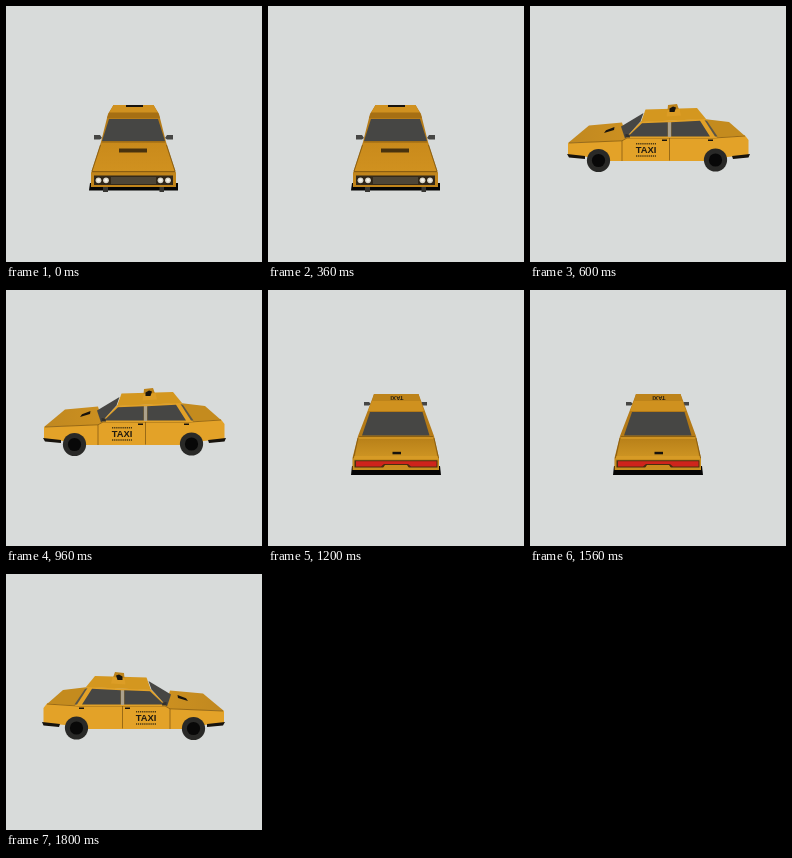
These frames come from a looping animation (256x256 px, 2.4 s). An HTML page:

```html
<!DOCTYPE html>
<html lang="en">
<head>
<meta charset="utf-8">
<title>Turning taxi</title>
<style>
html, body { margin: 0; width: 100%; height: 100%; overflow: hidden; background: #d8dbda; }
svg { display: block; width: 100vw; height: 100vh; }
.view { visibility: hidden; animation: show 2400ms step-end infinite; }
.front { animation-delay: 0ms; }
.left { animation-delay: -1800ms; }
.back { animation-delay: -1200ms; }
.right { animation-delay: -600ms; }
@keyframes show {
  0% { visibility: visible; }
  25%, 100% { visibility: hidden; }
}
text { font-family: "Liberation Sans", Arial, sans-serif; font-weight: bold; text-anchor: middle; fill: #211b10; }
.door { font-size: 9.4px; }
.sign { font-size: 6px; }
.glass { fill: #464644; }
.dark { fill: #17130d; }
.seam { fill: none; stroke: #79520f; stroke-width: .7; }
.check { fill: none; stroke: #4a3812; stroke-width: 1.4; stroke-dasharray: 1.3 .8; }
</style>
</head>
<body>
<svg viewBox="0 0 256 256">
  <defs>
    <linearGradient id="hood" x2="0" y2="1">
      <stop stop-color="#c98a1b"/><stop offset="1" stop-color="#d0911f"/>
    </linearGradient>
    <linearGradient id="trunk" x2="0" y2="1">
      <stop stop-color="#b98119"/><stop offset="1" stop-color="#cc9322"/>
    </linearGradient>
    <linearGradient id="bonnet">
      <stop stop-color="#c08820"/><stop offset="1" stop-color="#cc9020"/>
    </linearGradient>
    <g id="wheel">
      <circle r="11.6" fill="#292927"/>
      <circle r="6.6" fill="#080808"/>
    </g>
    <g id="lamp">
      <circle r="3.8" fill="#2a2114"/>
      <circle r="2.9" fill="#d9d5c8"/>
      <circle r="1.5" fill="#f4f2ea"/>
    </g>
    <g id="side">
      <path fill="url(#bonnet)" d="M38 137L59 119.5L92 116.5L97 133L91 135.5z"/>
      <path fill="#c48b1e" d="M174 113L199 116L215 130L184 132z"/>
      <path fill="#e3a228" d="M38 137L92 134.5L97 131.500H184L215 129.500L218.500 134V149L197 151V155H58V151L38 149z"/>
      <path class="seam" d="M39 137L92 134.800L97 132H184L215 130M139.500 132V154.500M92 135V155"/>
      <path fill="#e2a127" d="M111 115.500L139 114.500L175 112.500L187 132H95z"/>
      <path fill="#d4971f" d="M115.500 103.500L167 102L176 113L111 116z"/>
      <path class="glass" d="M113.500 107L91 120.500L95 132.500L110.500 115.500z"/>
      <path class="glass" d="M112 117.200L137.800 116.300V130.500H98zM141.200 116.200L170 114.800L180 130.500H141.200z"/>
      <path fill="#5a5547" d="M174.500 114L177 115L187.500 130.500H185z"/>
      <path fill="#aca18b" d="M138 116.300H141V131H138z"/>
      <path class="dark" d="M74 127L76 124.200L84.500 121L84 124z"/>
      <path fill="#33312c" d="M95.500 128L99.500 128.500L100 131.500H95.500z"/>
      <path fill="#bd831b" d="M138 99L147 98L149 103.500L137.500 104.500z"/>
      <path fill="#dc9d26" d="M137.500 104L149.500 103L151 109.500L136.500 110.500z"/>
      <path class="dark" d="M139.500 102.500L143 100.500L146 101.500L144.500 106H139.500z"/>
      <path class="dark" d="M37 148L55 150V153L39 151.500zM202 150L220 148L218.500 151.500L203 153z"/>
      <path class="dark" d="M132 133.500H137V135H132zM178 133.500H183V135H178z"/>
      <use href="#wheel" x="68.500" y="154.500"/>
      <use href="#wheel" x="185.500" y="154"/>
      <path class="check" d="M106 137.800H126M106 150H126"/>
    </g>
  </defs>
  <rect width="256" height="256" fill="#d8dbda"/>

  <g class="view front">
    <path fill="#050505" d="M84 177H172V184.500H83z"/>
    <path fill="#363632" d="M97 178H102V186H97zM153.500 178H158V186H153.500z"/>
    <path class="glass" d="M88 129H94L96 132L94 133.500H88zM161 129H167V133.500H161L159 132z"/>
    <path fill="#b67c18" d="M107.500 99H147.500L153 108L160 136L170 167V181H85V167L95 136L102 108z"/>
    <path fill="#d0911f" d="M107.500 99H147.500L152 107H103z"/>
    <path fill="#a66f13" d="M103 106.500H152L154 112H101z"/>
    <path class="dark" d="M120 99H137V101H120z"/>
    <path class="glass" d="M103 113H152L159 135H96z"/>
    <path fill="url(#hood)" d="M96 136H159L168.500 165H86.500z"/>
    <path class="seam" d="M96 136H159M94.500 139L86 165M160.500 139L169 165M86 165.500H169"/>
    <path fill="#48320e" d="M113 142.500H141V146.500H113z"/>
    <path fill="#c1851b" d="M85 167H170V181H85z"/>
    <path fill="#33291a" d="M88 169.500H167V179H88z"/>
    <path fill="#4e4637" d="M105 171H150V178H105z"/>
    <use href="#lamp" x="92.500" y="174.300"/>
    <use href="#lamp" x="100" y="174.300"/>
    <use href="#lamp" x="154.500" y="174.300"/>
    <use href="#lamp" x="162" y="174.300"/>
  </g>

  <g class="view left">
    <use href="#side"/>
    <text class="door" x="116" y="147.300">TAXI</text>
  </g>

  <g class="view back">
    <path fill="#050505" d="M84 176H172L173 185H83z"/>
    <path class="glass" d="M96 112H101L103 114L101 115.500H96zM154 112H159V115.500H154L152 114z"/>
    <path fill="#b47a17" d="M106 104H150.500L156.500 120L166 146L171 168V180H84.500V168L90 146L100 120z"/>
    <path fill="#bd831a" d="M106 104H150.500L152.500 111H104z"/>
    <path fill="#cf911f" d="M104 111H152.500L156 121H100z"/>
    <text class="sign" transform="translate(129 105.700) rotate(180)">TAXI</text>
    <path class="glass" d="M102 122H154.500L161.500 145.500H94z"/>
    <path fill="#cf9322" d="M91 146.500H165L166 150H90z"/>
    <path fill="url(#trunk)" d="M90 149H166L169 166H87z"/>
    <path class="seam" d="M91 146.500H165M90 148L85.500 168H170.500L166 148"/>
    <path fill="#d79b26" d="M86.500 166H169.500L171 170H85z"/>
    <path class="dark" d="M124.500 161.800H133V164.300H124.500z"/>
    <path fill="#c88e1e" d="M85 169H171V180H85z"/>
    <path fill="#4a2d10" d="M86.500 170.300H169.500V177.500H86.500z"/>
    <path fill="#cf241c" d="M88 171.300H168.500V176.500H143L140 174H116L113 176.500H88z"/>
    <path fill="#c98b1d" d="M117 175H139L141 178H115z"/>
  </g>

  <g class="view right">
    <use href="#side" transform="translate(256 0) scale(-1 1)"/>
    <text class="door" x="140" y="147.300">TAXI</text>
  </g>
</svg>
</body>
</html>
```
